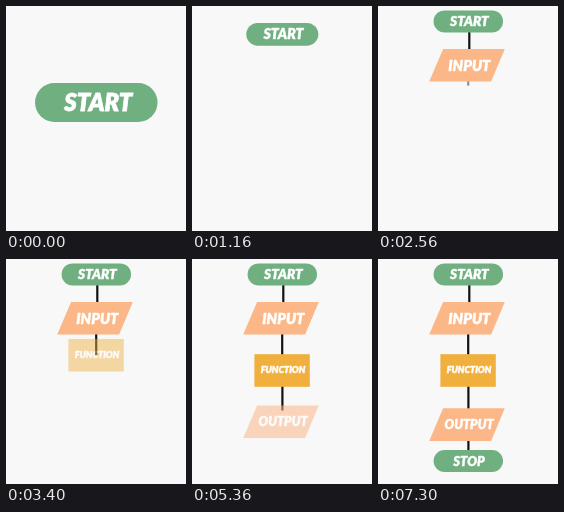
Recreate the animation shown at these times as an HTML page. Size 180 by 225 pixels, loop 8.13 s.

```html
<!DOCTYPE html>
<html lang="en">
<head>
<meta charset="utf-8">
<title>Flowchart</title>
<style>
  html, body { margin: 0; width: 100%; height: 100%; overflow: hidden; background: #f8f8f8; }
  svg { display: block; width: 100vw; height: 100vh; }
  text {
    font-family: Lato, "Open Sans", sans-serif;
    font-weight: 900;
    font-style: italic;
    text-anchor: middle;
    fill: #fff;
    stroke: #fff;
    stroke-width: .45px;
  }
</style>
</head>
<body>
<svg id="stage" viewBox="0 0 180 225"></svg>
<script>
const LOOP = 8130;
const GREEN = "#70af80", PEACH = "#fbb787", GOLD = "#f1b03e";
const stage = document.getElementById("stage");

function add(parent, tag, attrs, content = "") {
  const node = document.createElementNS("http://www.w3.org/2000/svg", tag);
  for (const key in attrs) node.setAttribute(key, attrs[key]);
  node.textContent = content;
  parent.append(node);
  return node;
}

const progress = (t, start, length) => Math.min(1, Math.max(0, (t - start) / length));
const ease = p => p < .5 ? 2 * p * p : 1 - 2 * (1 - p) ** 2;
const mix = (a, b, p) => a + (b - a) * p;

function block(label, size, cx, cy, draw) {
  const group = add(stage, "g", {});
  draw(group);
  add(group, "text", { x: cx, y: cy + size * .36, "font-size": size }, label);
  return group;
}

const pill = y => group =>
  add(group, "rect", { x: 55.6, y, width: 69.4, height: 22, rx: 11, fill: GREEN });
const slant = y => group =>
  add(group, "path", { d: `M65.1 ${y}H126.8L113.1 ${y + 32.6}H51.2Z`, fill: PEACH });
const box = y => group =>
  add(group, "rect", { x: 62.4, y, width: 55.4, height: 32.6, fill: GOLD });
const line = (x, top, bottom) =>
  add(stage, "path", { d: `M${x} ${top}V${bottom}`, stroke: "#111", "stroke-width": 2.2 });

// Each part slides down by `drop` while it fades in.
const parts = [
  { node: line(91.3, 24, 45.5), drop: 16, start: 1340, move: 590, fade: 300 },
  { node: line(90.2, 74, 95.8), drop: 18, start: 2400, move: 720, fade: 360 },
  { node: line(90.4, 126, 151.5), drop: 20, start: 4250, move: 770, fade: 380 },
  { node: line(90.4, 180, 193), drop: 10, start: 5910, move: 480, fade: 260 },
  { node: block("INPUT", 14.6, 91.3, 60, slant(43)), drop: 14, start: 1930, move: 400, fade: 400 },
  { node: block("FUNCTION", 9.1, 91, 111.2, box(95.2)), drop: 18, start: 3140, move: 950, fade: 570 },
  { node: block("OUTPUT", 12.6, 91.1, 165.6, slant(149.3)), drop: 18, start: 5030, move: 460, fade: 610 },
  { node: block("STOP", 12.9, 91, 202.3, pill(191)), drop: 10, start: 6390, move: 740, fade: 900 }
];
const startPill = block("START", 13.5, 91.4, 15.2, pill(4.4));

function render(t) {
  const scale = mix(1.765, 1, ease(progress(t, 310, 1010)));
  const y = mix(96.5, 15.4, ease(progress(t, 700, 642)));
  startPill.setAttribute("transform", `translate(90.3 ${y}) scale(${scale}) translate(-90.3 -15.4)`);

  for (const { node, drop, start, move, fade } of parts) {
    const offset = drop * (ease(progress(t, start, move)) - 1);
    node.setAttribute("transform", `translate(0 ${offset})`);
    node.setAttribute("opacity", progress(t, start, fade));
  }
}

const began = performance.now();
function tick() {
  render((performance.now() - began) % LOOP);
  requestAnimationFrame(tick);
}
render(0);
requestAnimationFrame(tick);
</script>
</body>
</html>
```
